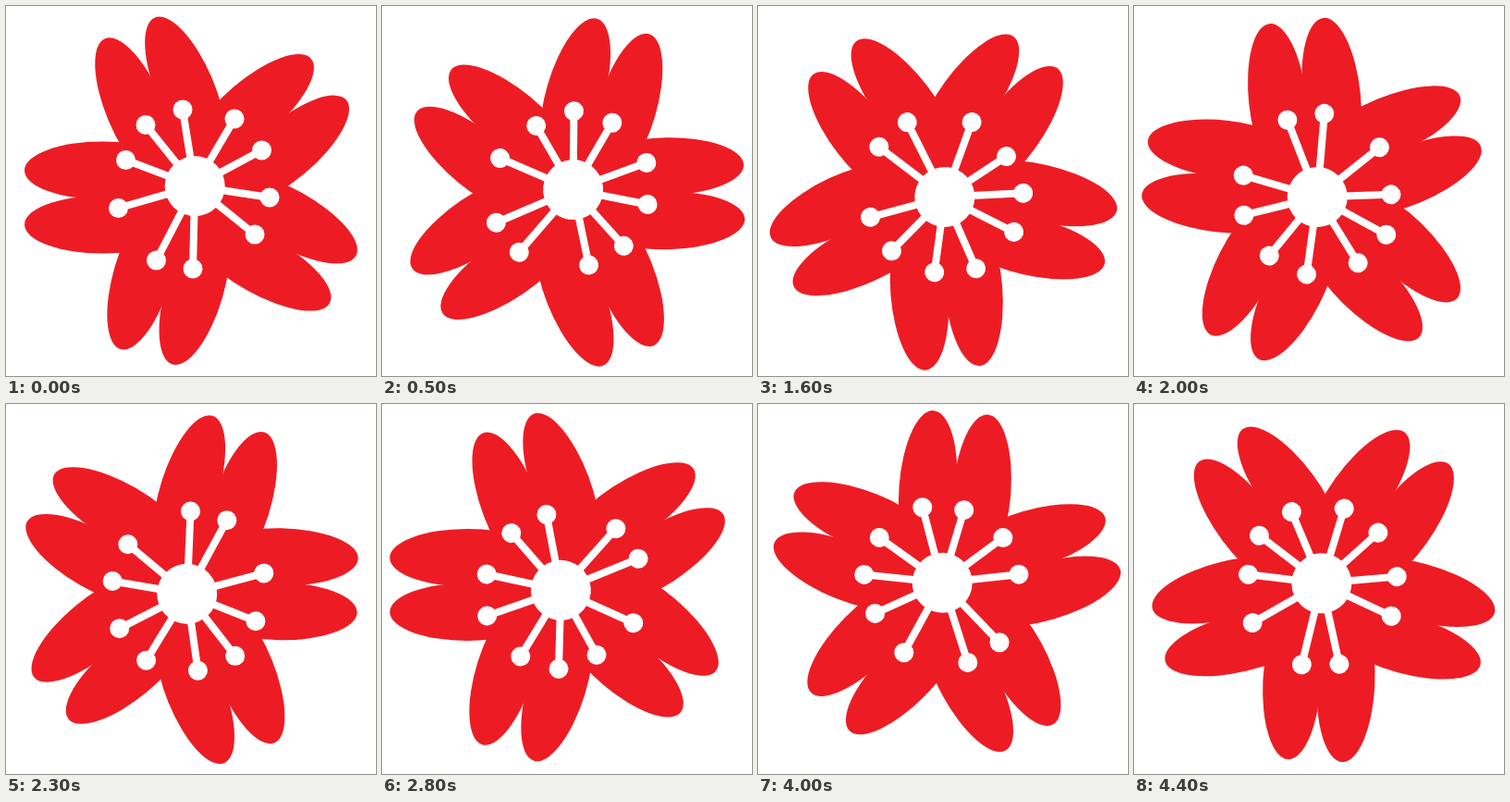
Animation, 400 px wide and 400 px high, one loop 4.5 s. Source, as an HTML page:

```html
<!DOCTYPE html>
<html lang="en">
<head>
<meta charset="utf-8">
<title>Turning blossom</title>
<style>
html, body { margin: 0; width: 100%; height: 100%; overflow: hidden; background: #fff; }
svg { display: block; width: 100%; height: 100%; }
</style>
</head>
<body>
<svg viewBox="0 0 400 400">
  <g id="flower">
    <g id="petals" fill="#ed1c24"><circle cx="204" cy="197" r="88"/></g>
    <g id="stamens" fill="#fff" stroke="#fff"></g>
  </g>
</svg>
<script>
const LOOP = 4500, STEP = 100, TURN = 7.87; // degrees per step
const CENTER = [204.2, 194.7];
const flower = document.getElementById('flower');

// Each petal: the notch between its two lobes and the direction it points in.
const petals = [
  [155.5, 74.5, 247],
  [307, 115, -40.5],
  [316, 269, 29],
  [167.5, 326.5, 106.5],
  [75, 207, 180]
];
const tips = [
  [247, 122], [276.5, 156], [285, 207], [269, 247], [202, 284],
  [162.5, 275], [121.5, 218.5], [129.5, 166.5], [151, 128.5], [191, 112]
];

function add(parent, tag, attrs) {
  const el = document.createElementNS('http://www.w3.org/2000/svg', tag);
  for (const key in attrs) el.setAttribute(key, attrs[key]);
  document.getElementById(parent).append(el);
}

function dot([cx, cy], r) {
  add('stamens', 'circle', { cx, cy, r, stroke: 'none' });
}

for (const [x, y, angle] of petals)
  for (const side of [-1, 1])
    add('petals', 'ellipse', {
      cx: -29, cy: 29.3 * side, rx: 84, ry: 31.2,
      transform: `translate(${x} ${y}) rotate(${angle})`
    });

for (const tip of tips) {
  add('stamens', 'line', {
    x1: CENTER[0], y1: CENTER[1], x2: tip[0], y2: tip[1], 'stroke-width': 8
  });
  dot(tip, 10.5);
}
dot(CENTER, 32.5);

const start = performance.now();
function draw() {
  const time = Math.max(0, performance.now() - start) % LOOP;
  const angle = Math.floor(time / STEP) * TURN;
  flower.setAttribute('transform', `rotate(${angle} 200 200)`);
  requestAnimationFrame(draw);
}
draw();
</script>
</body>
</html>
```
